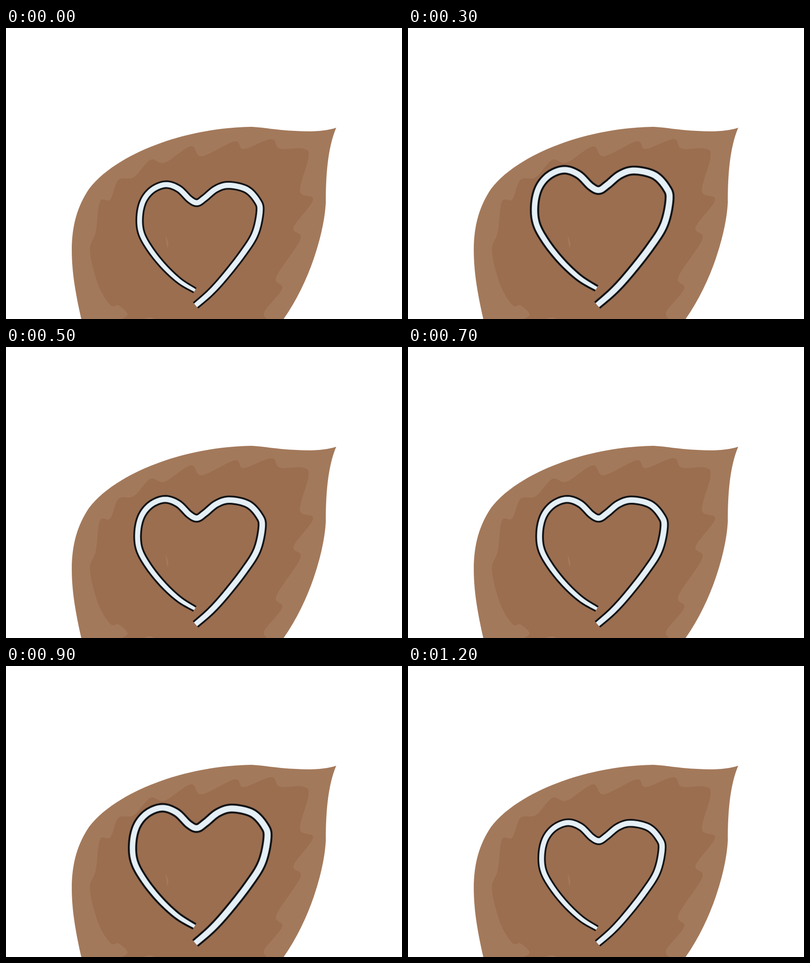
Animation of 873x642 px, one loop 2.2 s. Source, as an HTML page:

```html
<!DOCTYPE html>
<html lang="en">
<head>
<meta charset="utf-8">
<title>Beating heart on a leaf</title>
<style>
  html, body { margin: 0; width: 100%; height: 100%; overflow: hidden; background: #fff; }
  svg { display: block; width: 100%; height: 100%; }
  .light { fill: #a3795b; }
  .dark { fill: #9b6e50; }
  .line { fill: none; stroke: #0c0f11; stroke-width: 3.2; stroke-linejoin: round; }
  .soft { stroke-width: 4.8; stroke-opacity: .3; }
</style>
</head>
<body>
<svg viewBox="0 0 873 642">
  <path class="light" d="M166 642C152 580 145 535 145 490C145 435 158 392 183 355C235 285 380 221 540 218
    C570 219 600 227 665 228Q703 228 728 220C712 258 705 310 705 385C702 450 670 560 612 642Z"/>
  <path id="center" class="dark"/>
  <path class="light" d="M304 642Q317 635 328 642ZM352 459Q361 474 356 486Q353 474 352 459Z"/>
  <g id="heart">
    <path id="band" fill="#e5eff6"/>
    <path id="halo" class="line soft"/>
    <path id="outline" class="line"/>
  </g>
</svg>
<script>
const setPath = (id, d) => document.getElementById(id).setAttribute('d', d);

// Samples a Catmull-Rom curve through key points.
function smooth(keys, steps = 10) {
  const key = i => keys[Math.max(0, Math.min(keys.length - 1, i))];
  const points = [];
  for (let n = 0; n <= (keys.length - 1) * steps; n++) {
    const i = Math.floor(n / steps), t = n / steps - i;
    points.push([0, 1].map(axis => {
      const [a, b, c, d] = [-1, 0, 1, 2].map(k => key(i + k)[axis]);
      return b + t / 2 * (c - a + t * (2 * a - 5 * b + 4 * c - d + t * (3 * (b - c) + d - a)));
    }));
  }
  return points;
}

// Points beside a curve; the ribbon widens slowly and narrows at both tips.
function offset(points, side) {
  const last = points.length - 1;
  return points.map(([x, y], i) => {
    const [x0, y0] = points[Math.max(0, i - 1)], [x1, y1] = points[Math.min(last, i + 1)];
    const u = i / last, length = Math.hypot(x1 - x0, y1 - y0);
    const reach = side * (7.1 + u - 2 * Math.exp(-14 * u) - Math.exp(-14 * (1 - u))) / length;
    return [x + (y1 - y0) * reach, y - (x1 - x0) * reach];
  });
}

// Tips and notches of the scalloped edge, clockwise from the lower left.
const scallops = [[256, 642], [268, 631], [248, 612], [230, 611], [203, 566], [185, 491], [198, 450],
  [207, 383], [230, 378], [248, 335], [282, 329], [318, 291], [350, 297], [407, 261], [432, 283],
  [504, 250], [524, 267], [585, 245], [603, 266], [655, 266], [667, 285], [648, 360], [677, 379],
  [634, 440], [649, 466], [596, 549], [609, 575], [570, 625], [575, 642]];
setPath('center', `M${smooth(scallops).join('L')}Z`);

// Middle of the heart's ribbon, from the left tip over the top to the right tip.
const heartLine = smooth([[416.5, 579], [383, 558.5], [348, 526], [317, 487], [298, 451], [295, 414],
  [303.5, 380], [324, 356], [353, 345.5], [381, 355], [405, 378], [421.5, 385.5], [438, 375],
  [463, 355], [491, 347], [530, 356], [554, 381], [560, 404], [549, 454], [521, 499], [481, 550],
  [450, 584], [418, 612]]);
const outer = offset(heartLine, 1), inner = offset(heartLine, -1);
setPath('band', `M${[...outer, ...inner.reverse()].join('L')}Z`);
for (const id of ['halo', 'outline']) setPath(id, `M${outer.join('L')}M${inner.join('L')}`);

// Two beats of six steps, then a rest; the heart grows from its lower tip.
const heart = document.getElementById('heart');
function draw(now) {
  const t = now % 2200;
  const step = t < 1200 ? Math.floor(t / 100) % 6 : 0;
  const rise = Math.min(step, 6 - step);
  const scale = 1 + 0.032 * rise + 0.0028 * rise * rise;
  heart.setAttribute('transform', `translate(424 616) scale(${scale}) translate(-424 -616)`);
}
function tick() {
  draw(performance.now());
  requestAnimationFrame(tick);
}
tick();
</script>
</body>
</html>
```
